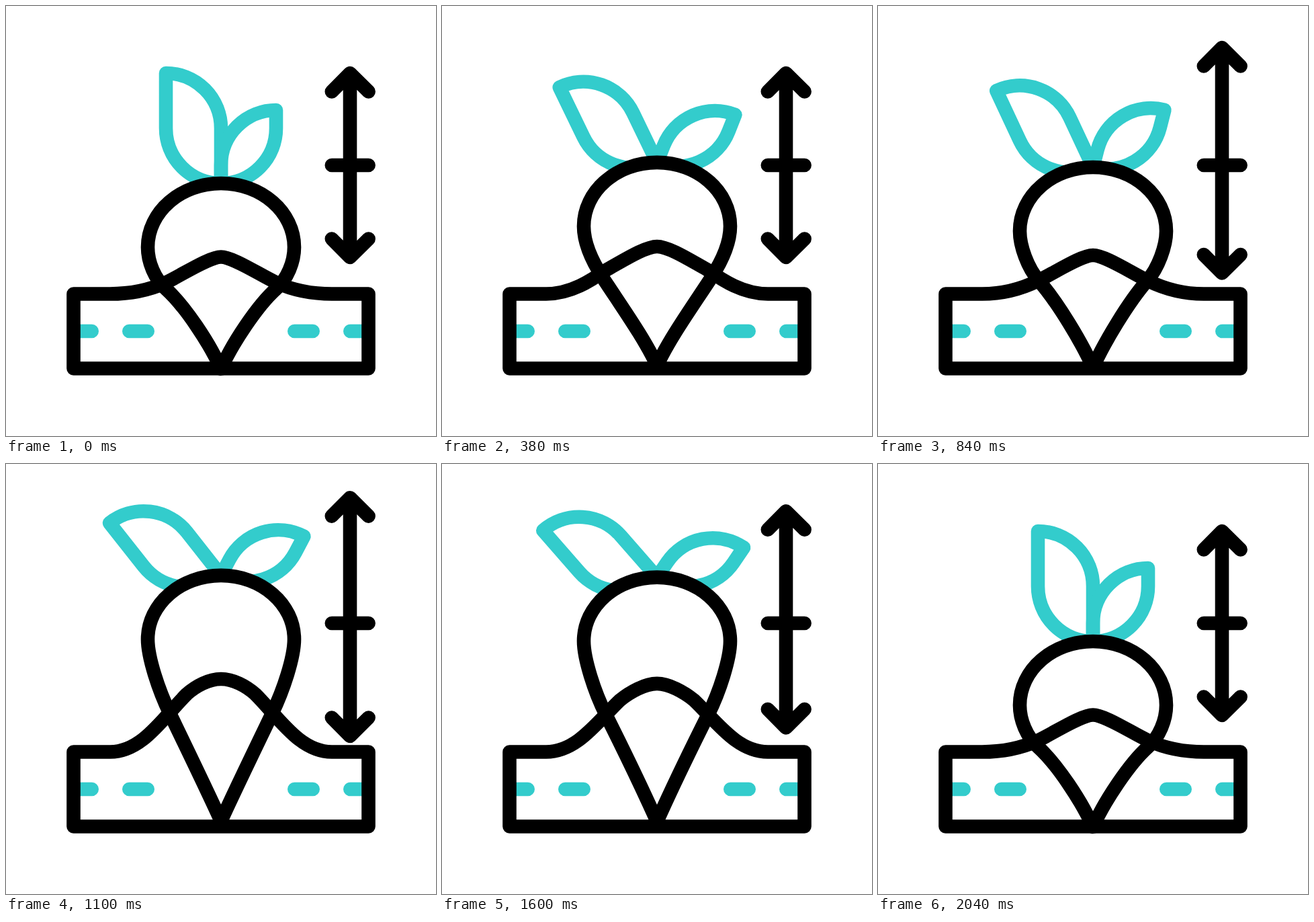
An HTML page for the animation above (2.4 s loop, 640 by 640 pixels).

```html
<!DOCTYPE html>
<html lang="en">
<head>
<meta charset="utf-8">
<title>Growing root</title>
<style>
html, body { margin: 0; height: 100%; overflow: hidden; background: #fff; }
svg { display: block; width: 100vw; height: 100vh; }
path { fill: none; stroke: #000; stroke-width: 20.6; stroke-linecap: round; stroke-linejoin: round; }
.teal path { stroke: #3cc; }
#bulb { fill: #fff; }
</style>
</head>
<body>
<svg viewBox="0 0 640 640">
  <g class="teal">
    <path id="left" d="M0 0V-82A82 82 0 0 0-82-164V-82A82 82 0 0 0 0 0Z"/>
    <path id="right" d="M0 0V-27A82 82 0 0 1 82-109V-82A82 82 0 0 1 0 0Z"/>
    <path d="M101 484H127.7M183.3 484H210.7M429.3 484H456.7M512.3 484H539"/>
  </g>
  <path id="bulb"/>
  <path id="ground"/>
  <path id="arrow"/>
</svg>
<script>
const LOOP = 2400;
const $ = id => document.getElementById(id);
const mix = (a, b, u) => a + (b - a) * u;
const linear = u => u;
const smooth = u => u * u * (3 - 2 * u);
const easeOut = u => 1 - (1 - u) ** 2;

// Starts at 0 and makes moves of [begin, end, value, ease] one after another
function follow(t, moves) {
  return moves.reduce((v, [begin, end, to, ease = smooth]) =>
    mix(v, to, ease(Math.min(1, Math.max(0, (t - begin) / (end - begin))))), 0);
}

// Two pulls on the root, a small one and a full one, then the drop
const pull = (t, first, slack, top, end) => follow(t,
  [[0, 600, first], [600, 840, slack], [840, top, 1], [1500, end, 0]]);
const lean = (t, first, slack, full) => follow(t,
  [[0, 600, first], [600, 840, slack], [840, 1500, full, linear], [1500, 1780, 0]]);

// Joins a left half, running to the middle, with its mirror image
function mirrored(points) {
  const back = points.slice(0, -1).reverse().map(([x, y]) => [640 - x, y]);
  return points[0] + "C" + [...points.slice(1), ...back].join(" ");
}

function drawBulb(top, lift, stretch) {
  const side = top + 95, taut = Math.sqrt(stretch), tip = 540 - 9 * taut;
  const x = mix(238, 245, lift), y = mix(421, 363, lift);
  const dx = 28, dy = mix(25, 60, taut);
  $("bulb").setAttribute("d", "M" + mirrored([
    [320, tip], [303, tip - 38], [x + dx, y + dy], [x, y],
    [x - dx * .6, y - dy * .6], [211, side + mix(22, 28, stretch)], [211, side],
    [211, side - 52.5], [260, top], [320, top]]) + "Z");
}

function drawGround(stretch) {
  const at = (x0, y0, x1, y1) => [mix(x0, x1, stretch), mix(y0, y1, stretch)];
  const peak = mix(373.5, 313.5, stretch);
  $("ground").setAttribute("d", "M100.5 428.5L" + mirrored([
    [155, 428.5], at(188, 428.5, 205, 428.5), at(217, 421, 236, 372),
    at(237, 412, 273, 334), at(261, 401, 285, 322),
    [302, peak], [320, peak]]) + "H539.5V539.5H100.5Z");
}

function drawArrow(rise) {
  const up = 100 - rise, down = 374 + rise * (rise > 0 ? .62 : 1);
  const head = (y, dy) => `M484.8 ${y + dy}L512 ${y}L539.6 ${y + dy}`;
  $("arrow").setAttribute("d",
    `M512 ${up}V${down}M484.8 237H539.6` + head(up, 27.4) + head(down, -27.4));
}

function draw(t) {
  const lift = pull(t, .388, .209, 1200, 1885);
  const stretch = pull(t, .372, .042, 1170, 1830);
  const top = 264 - 115 * lift;
  const turn = (id, angle) =>
    $(id).setAttribute("transform", `translate(320 ${top}) rotate(${angle})`);

  turn("left", lean(t, -37, -25, -58.5));
  turn("right", lean(t, 31, 14.3, 48.5));
  drawBulb(top, lift, stretch);
  drawGround(stretch);
  drawArrow(follow(t, [[500, 1180, 50.5, easeOut], [1500, 1780, -19.5], [1780, 2040, 0]]));
}

const start = performance.now();
function tick() {
  draw((performance.now() - start) % LOOP);
  requestAnimationFrame(tick);
}
tick();
</script>
</body>
</html>
```
